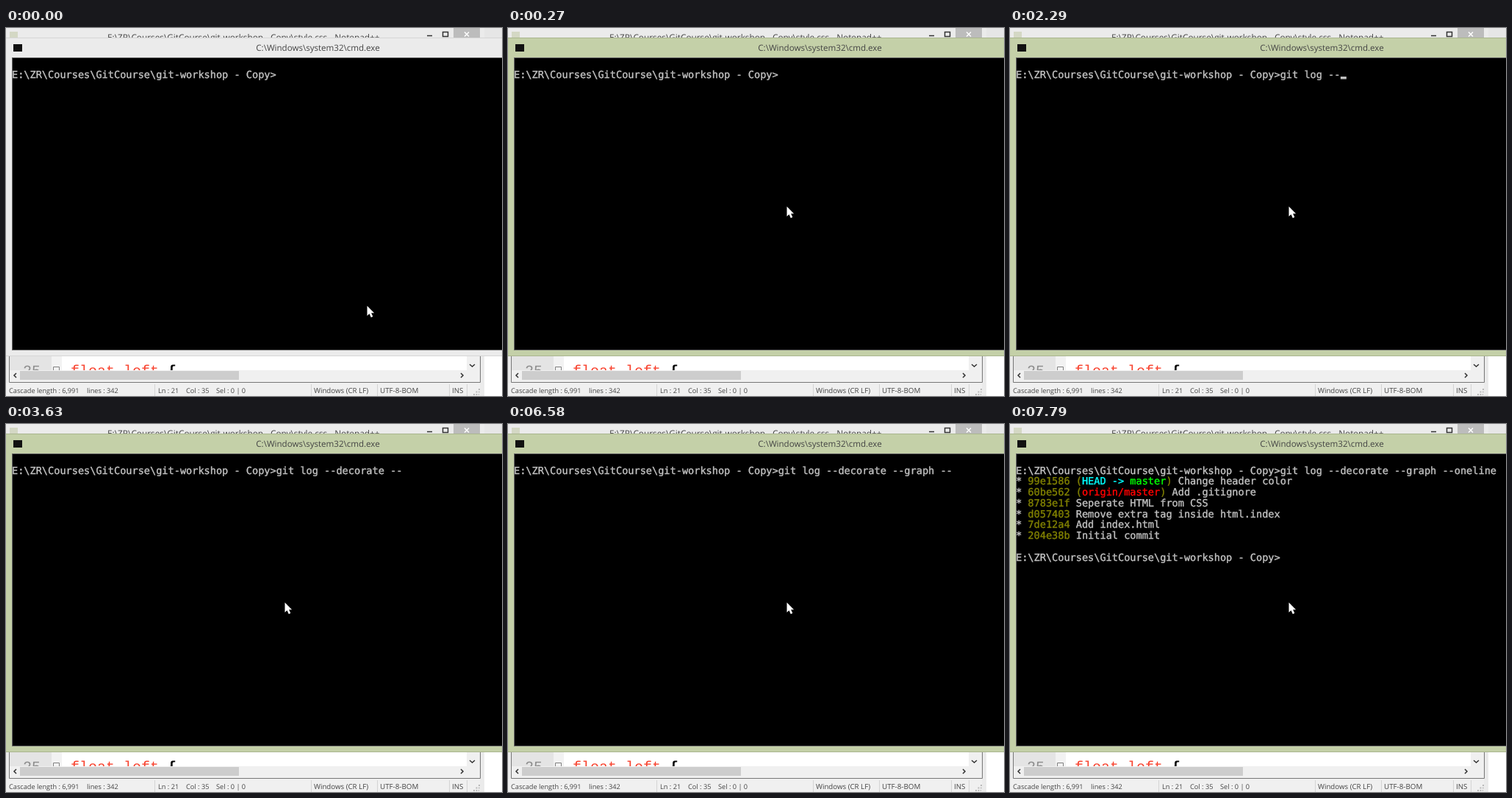
An HTML page for the animation above (8000 ms loop, 675 px wide and 500 px high).

```html
<!DOCTYPE html>
<html lang="en">
<head>
<meta charset="utf-8">
<title>git log in a console</title>
<style>
html, body { margin: 0; width: 100%; height: 100%; overflow: hidden; background: #fff; }
svg { display: block; }
text { white-space: pre; text-rendering: geometricPrecision; }
.ui { font-family: "Open Sans", "Noto Sans", sans-serif; fill: #444; }
.code { font: 20px "Liberation Mono", monospace; }
.console { font: 13.59px "DejaVu Sans Mono", monospace; --ink: #c0c0c0; }
.console text, .console tspan { fill: var(--ink); stroke: var(--ink); stroke-width: .4; }
.hash { --ink: #808000; }
.head { --ink: #0ff; }
.local { --ink: #0f0; }
.remote { --ink: #f00; }
.icon { fill: none; stroke: #333; }
</style>
</head>
<body>
<svg width="675" height="500" viewBox="0 0 675 500">
  <!-- Editor window behind -->
  <rect width="675" height="14" fill="#e6e6e6"/>
  <rect width="651" height="500" fill="#ebebeb"/>
  <rect x="5" y="5" width="11" height="9" fill="#d4d8c4"/>
  <text class="ui" x="138" y="16.5" font-size="11.8">E:\ZR\Courses\GitCourse\git-workshop - Copy\style.css - Notepad++</text>
  <rect x="609" width="36" height="14" fill="#bcbcbc"/>
  <path class="icon" stroke-width="1.5" d="M573 10.5h7M594.5 5.5h7v6h-7z"/>
  <path class="icon" stroke-width="1.5" style="stroke:#fff" d="M624 5.5l6 6m0-6l-6 6"/>

  <rect x="5" y="440" width="640" height="26" fill="#fff"/>
  <rect x="5" y="440" width="57" height="26" fill="#e4e4e4"/>
  <rect x="62" y="440" width="14" height="26" fill="#f2f2f2"/>
  <path class="icon" style="stroke:#808080" d="M64.5 466v-5.5h8v5.5"/>
  <text class="code" x="23" y="472" fill="#8c8c8c">25</text>
  <text class="code" x="76" y="472" fill="#f8432f">.float_left <tspan fill="#000" font-weight="bold">{</tspan></text>
  <rect x="627" y="445" width="18" height="21" fill="#f0f0f0"/>
  <rect x="4" y="465" width="641" height="16" fill="#f0f0f0"/>
  <rect x="19" y="466" width="298" height="12" fill="#cdcdcd"/>
  <path class="icon" stroke-width="1.5" d="M14 469l-3 3 3 3M619 469l3 3-3 3M631 457l3.5 3 3.5-3"/>
  <path class="icon" style="stroke:#777" d="M4.5 445v36.5h641v-36.5"/>

  <rect y="482" width="645" height="18" fill="#f0f0f0"/>
  <path class="icon" style="stroke:#d4d4d4" d="M202.5 484v16M415.5 484v16M505.5 484v16M603.5 484v16M627.5 484v16"/>
  <path class="icon" style="stroke:#b8b8b8" stroke-width="2" stroke-dasharray="2 1.5" d="M636 498h8M639.5 494.5h5M643 491h2"/>
  <g class="ui" font-size="9.2">
    <text x="4" y="496.3">Cascade</text>
    <text x="42" y="496.3">length : 6,991</text>
    <text x="110" y="496.3">lines : 342</text>
    <text x="207" y="496.3">Ln : 21</text>
    <text x="245" y="496.3">Col : 35</text>
    <text x="286" y="496.3">Sel : 0 | 0</text>
    <text x="419" y="496.3" font-size="9.7">Windows (CR LF)</text>
    <text x="509" y="496.3" font-size="9.8">UTF-8-BOM</text>
    <text x="607" y="496.3" font-size="9.7">INS</text>
  </g>

  <!-- Console window -->
  <rect id="frame" x="-.5" y="13.5" width="680" height="432"/>
  <rect x="10" y="22" width="12" height="10" fill="#111"/>
  <text class="ui" id="title" x="424.5" y="31" font-size="11.55" text-anchor="middle"></text>
  <rect x="8.5" y="40.5" width="680" height="397" fill="#000" stroke="#666"/>
  <g class="console">
    <text id="line" x="8" y="67.7"></text>
    <rect id="caret" y="66" width="8" height="3.5" fill="#c0c0c0"/>
    <g id="output">
      <text x="8" y="82.4">* <tspan class="hash">99e1586 (</tspan><tspan class="head">HEAD -&gt; </tspan><tspan class="local">master</tspan><tspan class="hash">)</tspan> Change header color</text>
      <text x="8" y="97.2">* <tspan class="hash">60be562 (</tspan><tspan class="remote">origin/master</tspan><tspan class="hash">)</tspan> Add .gitignore</text>
      <text x="8" y="111.9">* <tspan class="hash">8783e1f</tspan> Seperate HTML from CSS</text>
      <text x="8" y="126.7">* <tspan class="hash">d057403</tspan> Remove extra tag inside html.index</text>
      <text x="8" y="141.4">* <tspan class="hash">7de12a4</tspan> Add index.html</text>
      <text x="8" y="156.2">* <tspan class="hash">204e38b</tspan> Initial commit</text>
      <text id="nextLine" x="8" y="185.7"></text>
    </g>
  </g>
  <path id="pointer" fill="#fff" d="M0 0v13.5l3-2.8 2.3 5 2.5-1.1-2.2-4.9h4z"/>
</svg>
<script>
const LOOP = 8000;
const CHAR = 8.182;
const PROMPT = "E:\\ZR\\Courses\\GitCourse\\git-workshop - Copy>";
const TITLE = "C:\\Windows\\system32\\cmd.exe";
const RUN = 7690, DONE = 7790;

// [first key, last key, keys]; "<" is a backspace
const bursts = [
  [780, 1500, "git log "], [2090, 2200, "--"], [2380, 3050, "decora"],
  [3180, 3630, "te --"], [4160, 4300, "gh"], [4700, 4770, "<<"],
  [4840, 4840, "g"], [5220, 5340, "ra"], [5500, 5600, "ph"],
  [5700, 5700, " "], [5880, 6040, "--"], [6360, 6360, " "],
  [6580, 6580, "<"], [6890, 7550, "oneline"]
];
const caretShown = [[1640, 1760], [2290, 2380], [3790, 3880], [5410, 5600], [6360, 6580]];

const $ = id => document.getElementById(id);
const clamp = v => Math.max(0, Math.min(1, v));
const mix = (a, b, p) => a + (b - a) * p;
const mixColor = (a, b, p) => `rgb(${a.map((v, i) => Math.round(mix(v, b[i], p)))})`;

function typedAt(t) {
  let text = "";
  for (const [first, last, keys] of bursts) {
    [...keys].forEach((key, i) => {
      if (t < first + (last - first) * i / Math.max(1, keys.length - 1)) return;
      text = key === "<" ? text.slice(0, -1) : text + key;
    });
  }
  return text;
}

function render(t) {
  // The pointer arrives first, then the window gains focus
  const step = clamp((Math.floor((t - 60) / 70) + 1) / 4);
  const move = clamp(step * 2), focus = clamp(step * 2 - 1);
  $("pointer").setAttribute("transform", `translate(${mix(491.5, 379.5, move)} ${mix(377.5, 242.5, move)})`);
  $("frame").style.fill = mixColor([235, 235, 235], [196, 208, 168], focus);
  $("frame").style.stroke = mixColor([214, 214, 214], [170, 182, 143], focus);

  const typed = typedAt(t);
  $("line").textContent = PROMPT + typed;
  $("caret").setAttribute("x", 8 + CHAR * (PROMPT.length + typed.length));
  $("caret").style.display = caretShown.some(([on, off]) => t >= on && t < off) ? "" : "none";
  $("title").textContent = t >= RUN && t < DONE ? `${TITLE} - ${typed}` : TITLE;
  $("output").style.display = t >= DONE ? "" : "none";
}

$("nextLine").textContent = PROMPT;
const start = performance.now();
function tick() {
  render((performance.now() - start) % LOOP);
  requestAnimationFrame(tick);
}
tick();
</script>
</body>
</html>
```
